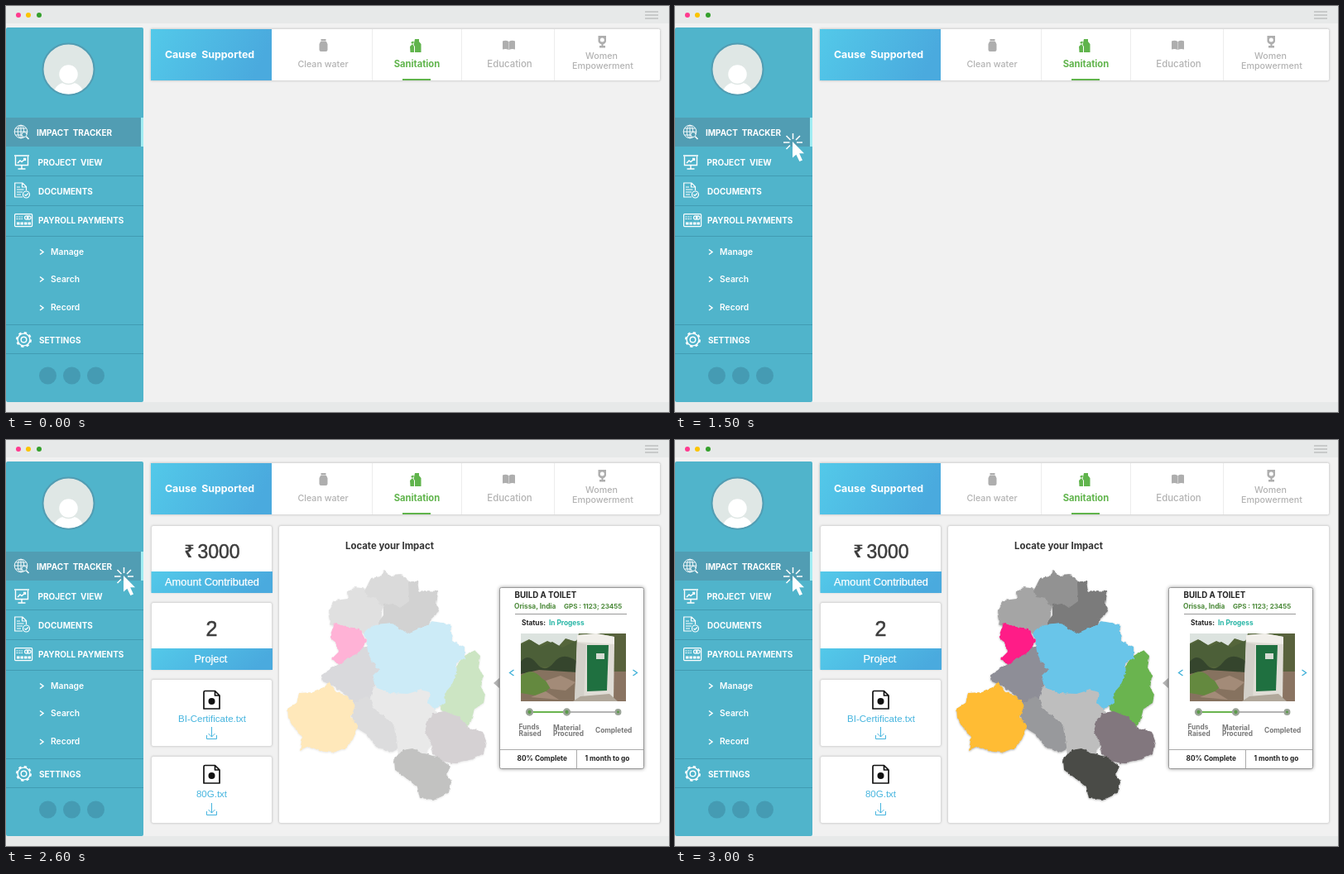
An HTML page for the animation above (8 s loop, 801 px wide and 491 px high).

```html
<!DOCTYPE html>
<html lang="en">
<head>
<meta charset="utf-8">
<title>Impact tracker</title>
<style>
html, body { margin: 0; width: 100%; height: 100%; overflow: hidden; background: #f1f1f1; }
svg { display: block; }
text { font: 700 10px Inter, sans-serif; white-space: pre; }
.menu text { fill: #fff; }
.menu .sub { font-size: 10.3px; font-weight: 600; }
.tabs text { font-size: 10.7px; font-weight: 500; fill: #b2b2b2; text-anchor: middle; }
.arial text { font: 12.8px "Liberation Sans", Arial, sans-serif; text-anchor: middle; }
.arial .figure { font-size: 23px; fill: #3d3d3d; stroke: #3d3d3d; stroke-width: .5; }
.arial .bar { fill: #fff; stroke: #fff; stroke-width: .25; }
.arial .file { font-size: 11.5px; fill: #45b4de; }
.info text { font-size: 8.3px; }
.line { fill: none; stroke: #fff; stroke-width: 1.2; }
.box { fill: #fff; stroke: #dadada; filter: drop-shadow(0 0 1px #0002); }

.far, .near, .click, .result, .map { animation: 8s step-end infinite; }
.far { animation-name: far; }
.near { animation-name: near; }
.click { animation-name: click; }
.result { animation-name: result; }
.map { animation-name: fade; }
@keyframes far { 0%, 12.5%, 100% { opacity: 0 } 6.25% { opacity: 1 } }
@keyframes near { 0%, 18.75%, 100% { opacity: 0 } 12.5% { opacity: 1 } }
@keyframes click { 0% { opacity: 0 } 18.75%, 100% { opacity: 1 } }
@keyframes result { 0% { opacity: 0 } 25%, 100% { opacity: 1 } }
@keyframes fade {
  0% { opacity: 0 }
  31.25% { opacity: 0; animation-timing-function: steps(6, start) }
  38.75%, 100% { opacity: 1 }
}
</style>
</head>
<body>
<svg width="801" height="491" viewBox="0 0 801 491">
<defs>
  <linearGradient id="blue" x2="1" y2=".2">
    <stop stop-color="#53c9e9"/><stop offset="1" stop-color="#4aaade"/>
  </linearGradient>
  <path id="cursor" fill="#fff" d="M0 0V19.5L4.4 15.8 8.4 24 12 22.4 8.2 14.3H14Z"/>
  <rect id="card" class="box" x="175.5" y=".5" width="146" height="81" rx="2.5"/>
  <g id="file" fill="none" stroke="#111" stroke-width="1.7" stroke-linejoin="round">
    <path d="M240.5 14.5H252.5L258 20V36H239V16Q239 14.5 240.5 14.5ZM252.5 14.5V20H258"/>
    <circle cx="248.5" cy="27" r="4" fill="#111" stroke="none"/>
  </g>
  <path id="download" fill="none" stroke="#45b4de" d="M248.5 58V70M244.5 66L248.5 70 252.5 66M242.5 68V72.5H254.5V68"/>
  <filter id="coast" x="-5%" y="-5%" width="110%" height="110%" color-interpolation-filters="sRGB">
    <feTurbulence type="fractalNoise" baseFrequency=".15" numOctaves="2" seed="4"/>
    <feDisplacementMap in="SourceGraphic" scale="4" xChannelSelector="R" yChannelSelector="G"/>
    <feDropShadow dx="0" dy="1" stdDeviation="1.2" flood-opacity=".3"/>
  </filter>
</defs>

<rect width="801" height="491" fill="#f1f1f1"/>
<path d="M0 0H801V21H0ZM0 479H801V491H0Z" fill="#e7e9e9"/>
<circle cx="15" cy="11" r="3" fill="#ff3b8f"/>
<circle cx="27" cy="11" r="3" fill="#fbc400"/>
<circle cx="40" cy="11" r="3" fill="#35a02c"/>
<path d="M772 7H788M772 11H788M772 15H788" stroke="#c8caca" stroke-width="2"/>

<g class="menu">
  <rect y="26" width="166" height="453" rx="2" fill="#50b4cb"/>
  <rect y="135" width="163" height="35" fill="#519db3"/>
  <rect x="163" y="135" width="3" height="35" fill="#a0edf3"/>
  <path d="M0 205.5H166M0 241.5H166M0 278.5H166M0 385.5H166M0 420.5H166" stroke="#419bb2"/>

  <clipPath id="face"><circle cx="75.5" cy="76.5" r="30"/></clipPath>
  <circle cx="75.5" cy="76.5" r="31" fill="#dfe7e5" stroke="#519db3" stroke-width="2"/>
  <g fill="#fff" clip-path="url(#face)">
    <path d="M56 109Q59 92 75.5 92T95 109Z"/>
    <circle cx="75.5" cy="82.5" r="12" stroke="#dfe7e5" stroke-width="1.5"/>
  </g>

  <g class="line">
    <g stroke-width=".9">
      <circle cx="18" cy="152" r="7.8"/>
      <ellipse cx="18" cy="152" rx="3.7" ry="7.8"/>
      <path d="M10 152H26M18 144V160M11.5 148H24.5M11.5 156H20"/>
      <circle cx="22" cy="155.5" r="3" fill="#519db3"/>
      <path d="M24.5 158L27.5 161" stroke-width="1.6"/>
    </g>
    <path d="M10 181H28M11.5 182V192.5H26.5V182M19 193V197M14.5 197H23.5M14 190L17 187 19 188.5 23.5 184.5M21 184.5H23.5V187" stroke-width="1.4"/>
    <path d="M20 231H10.7V214H20L24.5 218.5V223M19.5 214V219H24.5M13 219H17M13 222H21.5M13 225H20M13 228H18"/>
    <circle cx="24.5" cy="228" r="4"/><path d="M22.5 228L24 229.5 26.8 226.5"/>
    <rect x="10.6" y="251.6" width="21" height="15" rx="1"/>
    <path d="M12.5 255H20M12.5 257.5H20" stroke-dasharray="2 1"/>
    <circle cx="24.8" cy="256" r="2.2"/><circle cx="27.8" cy="256" r="2.2"/>
    <path d="M13 263H30" stroke-width="3" stroke-dasharray="3.5 1"/>
    <circle cx="21.5" cy="403.5" r="7.4" stroke-width="1.4"/>
    <circle cx="21.5" cy="403.5" r="8.6" stroke-width="1.8" stroke-dasharray="3.38"/>
    <circle cx="21.5" cy="403.5" r="3.3" stroke-width="1.4"/>
    <path d="M41 294.5L45 297.5 41 300.5M41 327.5L45 330.5 41 333.5M41 362L45 365 41 368" stroke-width="1.5"/>
  </g>
  <text x="37" y="157">IMPACT  TRACKER</text>
  <text x="38.5" y="193">PROJECT  VIEW</text>
  <text x="39" y="228">DOCUMENTS</text>
  <text x="39" y="263">PAYROLL PAYMENTS</text>
  <text class="sub" x="54" y="301">Manage</text>
  <text class="sub" x="54" y="334">Search</text>
  <text class="sub" x="54" y="368">Record</text>
  <text x="40" y="408">SETTINGS</text>
  <g fill="#459bb3">
    <circle cx="50.5" cy="447" r="10.5"/>
    <circle cx="79.5" cy="447" r="10.5"/>
    <circle cx="108.5" cy="447" r="10.5"/>
  </g>
</g>

<g class="tabs">
  <rect class="box" x="174.5" y="27.5" width="616" height="63" rx="2"/>
  <rect x="175" y="28" width="146" height="62" fill="url(#blue)"/>
  <path d="M442.5 28V90M550.5 28V90M662.5 28V90" stroke="#ececec"/>
  <rect x="479" y="88" width="34" height="2" fill="#60b44c"/>
  <g fill="#aeaeae">
    <path d="M380.5 40H386.5V42.5H380.5ZM380 43H387L388.5 46V53Q388.5 55 386.5 55H380.5Q378.5 55 378.5 53V46Z"/>
    <path d="M600 42.5Q604 41 607.3 43V53Q604 51.5 600 52.5ZM607.7 43Q611 41 615 42.5V52.5Q611 51.5 607.7 53Z"/>
    <path d="M715.5 36H725V43Q724 46 721.5 46.5V48H724V50.5H717V48H719.5V46.5Q716.5 46 715.5 43Z"/>
    <circle cx="720.3" cy="41" r="2.5" fill="#fff"/>
  </g>
  <path fill="#60b44c" d="M494 40H499V43L501.500 46V56H494V49L492.500 47ZM488 49L491 46 493 49V56H488.500ZM489 44L492 42.500 493 44 491 46Z"/>
  <text x="246" y="63" style="font-size:12.4px;font-weight:700;fill:#fff">Cause  Supported</text>
  <text x="383" y="74">Clean water</text>
  <text x="496.5" y="74" style="font-size:11.2px;font-weight:700;fill:#60b44c">Sanitation</text>
  <text x="608.5" y="74" style="font-size:11.4px">Education</text>
  <text x="719.5" y="64">Women</text>
  <text x="721" y="76">Empowerment</text>
</g>

<g class="result">
  <g class="arial">
    <use href="#card" y="103"/><use href="#card" y="196"/>
    <use href="#card" y="289"/><use href="#card" y="382"/>
    <rect x="175.5" y="159" width="146.5" height="26" fill="url(#blue)"/>
    <rect x="175.5" y="252" width="146.5" height="26" fill="url(#blue)"/>
    <text x="221.5" y="141.5" style="font:700 21.5px 'Noto Sans',sans-serif;fill:#3d3d3d">₹</text>
    <text class="figure" x="257" y="142.5">3000</text>
    <text class="figure" x="248.5" y="237" style="font-size:25px">2</text>
    <text class="bar" x="249" y="176">Amount Contributed</text>
    <text class="bar" x="247.5" y="269">Project</text>
    <use href="#file" y="289"/><use href="#download" y="289"/>
    <use href="#file" y="379"/><use href="#download" y="381"/>
    <text class="file" x="249" y="341">BI-Certificate.txt</text>
    <text class="file" x="248.5" y="432">80G.txt</text>
  </g>

  <rect class="box" x="329.5" y="103.5" width="461" height="360" rx="2.5"/>
  <text x="410" y="132" style="font-size:11.4px;fill:#333">Locate your Impact</text>

  <g class="map">
    <g filter="url(#coast)">
      <path fill="#a5a5a5" d="M392 223L389 207 397 194 413 192 412 184 422 178 436 180 455 200 452 228 434 234 410 230Z"/>
      <path fill="#929292" d="M434 181L441 167 452 165 456 157 464 164 478 163 487 171V198L478 205 455 203 448 192 436 190Z"/>
      <path fill="#7b7b7b" d="M456 199L467 197 476 203 487 195 486 172 497 170 499 184 508 182 522 183 520 199 524 207 513 217 508 230 487 240 451 229 450 220 456 212Z"/>
      <path fill="#8e8e97" d="M424 248L438 250 452 279 450 300 440 313 424 322 411 308 395 297 383 292 381 284 392 277 404 270 413 260Z"/>
      <path fill="#ff1c87" d="M397 221L412 226 427 228 435 243 427 257 412 264 403 272 393 265 402 256 396 243 391 238Z"/>
      <path fill="#98999c" d="M416 321L436 310 452 325 473 346V373L465 377 447 371 436 356 420 346Z"/>
      <path fill="#ffbc34" d="M340 325L351 318 354 306 371 305 384 300 390 292 400 305 412 309 422 320 417 335 425 348 419 362 411 372 395 378 379 376 366 370 355 375 358 360 347 346 341 336Z"/>
      <path fill="#bebebe" d="M445 297L464 302 508 298 518 306 516 324 522 331 513 345 516 365 506 381 490 376 474 379 470 347 456 334 443 323 440 311Z"/>
      <path fill="#6ab44f" d="M556 259L566 254 573 261 571 275 576 285 574 300 579 308 577 318 566 325 562 340 556 349 540 339 525 326 526 305 535 287 547 270Z"/>
      <path fill="#82777e" d="M516 330L530 328 547 335 557 347 576 353 580 364 577 379 564 386 541 391 525 388 515 378 513 365 506 352 510 338Z"/>
      <path fill="#69c5e9" d="M433 231L446 224 467 222 485 234 506 225 515 219 537 223 539 243 554 251 554 264 543 270 544 284 538 297 530 306 531 317 518 326 510 318 512 305 502 302 485 307 464 306 446 299 443 286 451 278 441 267 437 254Z"/>
      <path fill="#4a4b47" d="M469 387L479 375 491 373 505 379 521 383 537 395 532 405 538 412 536 426 517 435 500 433 497 420 485 410 470 399Z"/>
    </g>
  </g>

  <g class="info">
    <path d="M589 294L597 287V301Z" fill="#b5b5b5"/>
    <rect x="596.5" y="178.5" width="174" height="219" rx="2" fill="#fff" stroke="#999" style="filter:drop-shadow(0 0 2px #0006)"/>
    <text x="614.5" y="191" style="font-size:9.7px;fill:#222">BUILD A TOILET</text>
    <g fill="#4c8a3a">
      <text x="614" y="204">Orissa, India</text>
      <text x="674" y="204" style="font-size:8px">GPS : 1123; 23455</text>
    </g>
    <path d="M615 210.5H750" stroke="#999"/>
    <text x="623" y="224" fill="#222">Status:</text>
    <text x="656" y="224" fill="#25b5a5">In Progess</text>

    <svg x="622" y="234" width="127" height="82" viewBox="0 0 127 82">
      <rect width="127" height="82" fill="#54653a"/>
      <path d="M0 0H70L67 10 54 6 46 15 32 9 22 14 10 7 0 12Z" fill="#dce3df"/>
      <path d="M0 14L12 8 24 16 38 10 50 17 68 8V38L0 42Z" fill="#4c5f38"/>
      <path d="M0 34Q9 23 19 36T40 35 68 34V52L0 56Z" fill="#35452d"/>
      <path d="M0 49L22 44 68 47V82H0Z" fill="#86725f"/>
      <path d="M0 51Q14 40 25 54L38 63 24 76 0 72Z" fill="#64893f"/>
      <path d="M30 57L48 51 66 59 54 69 36 67ZM12 77L30 70 46 80Z" fill="#a38b78"/>
      <path d="M111 0H127V82H111Z" fill="#59623d"/>
      <path d="M111 46H127V82H108Z" fill="#8a7462"/>
      <path d="M68 2L91 0 113 4V14L112 82H65Z" fill="#e0ddd6"/>
      <path d="M68 2L91 0 113 4V13L68 10Z" fill="#f1efea"/>
      <path d="M68 11L79 13 76 82H65Z" fill="#d3d0c9"/>
      <path d="M80 14H106L104 69 80 70Z" fill="#1f7040"/>
      <rect x="91" y="24" width="10" height="7" fill="#d5dcd3"/>
      <path d="M63 82L72 76 107 73 117 82Z" fill="#b0a79a"/>
    </svg>

    <path d="M613.5 278L608.5 281.5 613.5 285M757.5 278L762.5 281.5 757.5 285" fill="none" stroke="#3cafd8" stroke-width="1.3"/>
    <path d="M677 329H740" stroke="#b4b4b4" stroke-width="2"/>
    <path d="M632 329H677" stroke="#6ab44f" stroke-width="2"/>
    <g fill="#5b9b4a" stroke="#9aa397" stroke-width="2.5">
      <circle cx="632.5" cy="329" r="3.4"/>
      <circle cx="677.5" cy="329" r="3.4"/>
      <circle cx="739.5" cy="329" r="2.7"/>
    </g>
    <g fill="#777">
      <text x="619.5" y="350">Funds</text>
      <text x="619.5" y="358">Raised</text>
      <text x="661" y="351">Material</text>
      <text x="661" y="358">Procured</text>
      <text x="712" y="354">Completed</text>
    </g>
    <path d="M597 374.5H770M689.5 375V397" stroke="#aaa"/>
    <g fill="#222" font-weight="600">
      <text x="617.5" y="388">80% Complete</text>
      <text x="699.5" y="388">1 month to go</text>
    </g>
  </g>
</g>

<use class="far" href="#cursor" x="150" y="273"/>
<use class="near" href="#cursor" x="134" y="218"/>
<g class="click">
  <use href="#cursor" x="142" y="164"/>
  <path class="line" style="stroke-width:1.5" d="M142.5 154V161M131 165H138.5M147 165H154M134.5 157L139.5 162M151 157L146 162M134.5 173L139 168.5"/>
</g>
</svg>
</body>
</html>
```
